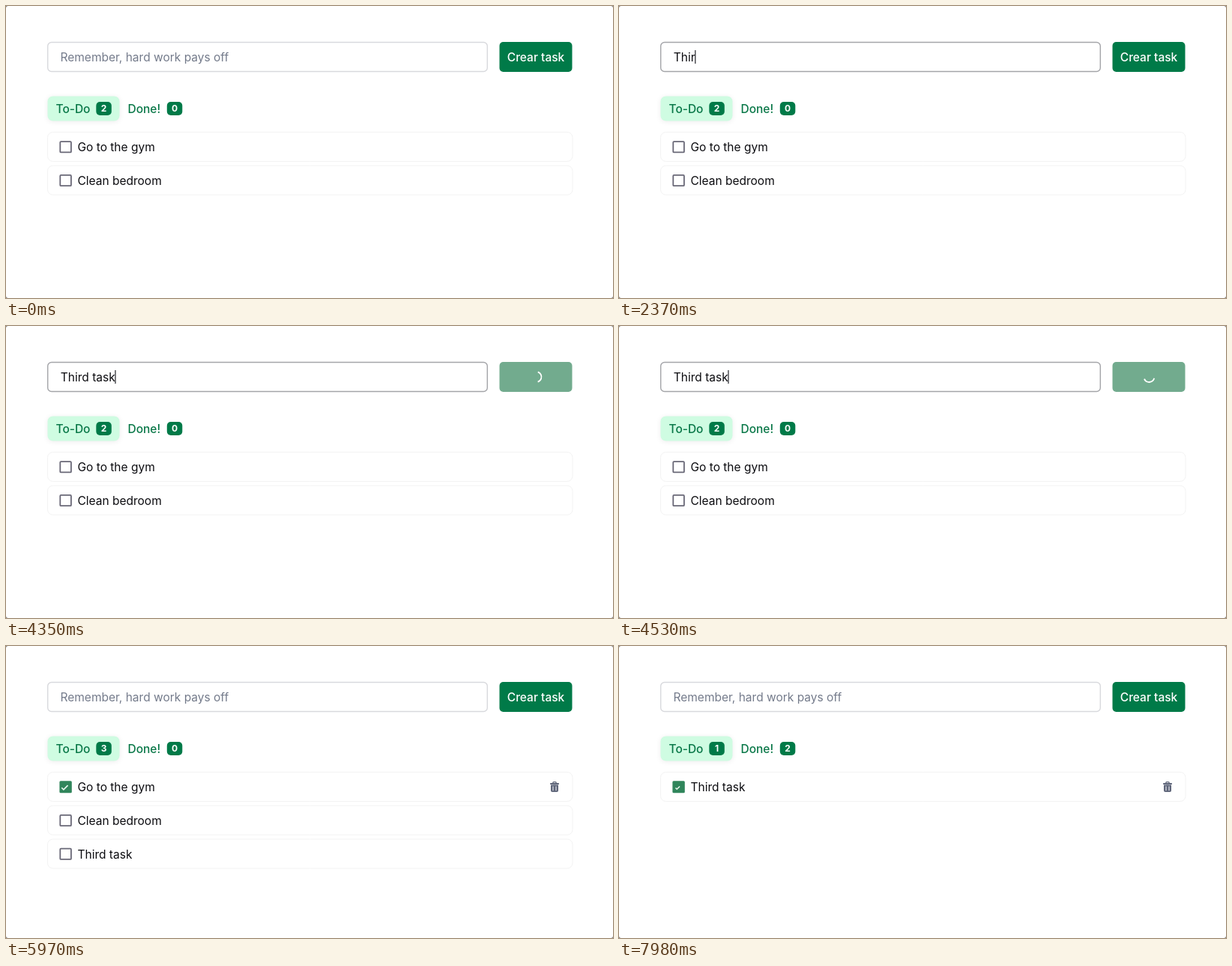
Animation of 810 by 390 pixels, one loop 8000 ms. Source, as an HTML page with a canvas:

```html
<!DOCTYPE html>
<html lang="en">
<head>
<meta charset="utf-8">
<title>Task list</title>
<style>
  html, body { margin: 0; width: 100%; height: 100%; overflow: hidden; background: #fff; }
  canvas { display: block; width: 810px; height: 390px; }
</style>
</head>
<body>
<canvas id="stage"></canvas>
<script>
const W = 810, H = 390, LOOP = 8000;
const canvas = document.getElementById('stage');
const ctx = canvas.getContext('2d');
const dpr = window.devicePixelRatio || 1;
canvas.width = W * dpr;
canvas.height = H * dpr;

const GREEN = '#007a48', INK = '#0c0c10', SLATE = '#5f667a';
const FONT = 'Inter, "Open Sans", sans-serif';
const FIRST_ROW = 168, ROW_STEP = 44.75, CHECK_TIME = 180;

const typed = 'Third task';
const keyTimes = [1980, 2130, 2250, 2370, 2490, 2640, 2880, 3000, 3150, 3390];
const caretSpans = [[1230, 1710], [1980, 3900], [4320, 4890], [5400, 5850]];
const tasks = [
  { name: 'Go to the gym', from: 0, checked: 5820, gone: 6150 },
  { name: 'Clean bedroom', from: 0, checked: 6750, gone: 7100 },
  { name: typed, from: 4590, checked: 7860, gone: Infinity }
];
const submit = 4320, added = 4590, trashShown = 5400;

const clamp = v => Math.max(0, Math.min(1, v));
const ramp = (t, a, b) => clamp((t - a) / (b - a));

function box(x, y, w, h, r, fill, stroke, line = 1) {
  ctx.beginPath();
  ctx.roundRect(x, y, w, h, r);
  if (fill) { ctx.fillStyle = fill; ctx.fill(); }
  if (stroke) { ctx.strokeStyle = stroke; ctx.lineWidth = line; ctx.stroke(); }
}

function text(str, x, y, color, weight = 400, size = 15.5, align = 'left') {
  ctx.font = `${weight} ${size}px ${FONT}`;
  ctx.textAlign = align;
  ctx.fillStyle = color;
  ctx.fillText(str, x, y);
}

function drawInput(t) {
  const hover = ramp(t, 585, 660) * (1 - ramp(t, 4875, 4950));
  const shade = [216, 217, 221].map(c => Math.round(c - 52 * hover));
  box(55.7, 48.5, 586.6, 39, 5, '#fff', `rgb(${shade})`, 1.4);

  const count = t < added ? keyTimes.filter(k => t >= k).length : 0;
  const value = typed.slice(0, count);
  if (count) text(value, 72.8, 74, INK);
  else text('Remember, hard work pays off', 72.5, 74, '#747b8b');

  if (caretSpans.some(([a, b]) => t >= a && t < b)) {
    ctx.font = `400 15.5px ${FONT}`;
    ctx.fillStyle = '#33343a';
    ctx.fillRect(72.4 + ctx.measureText(value).width, 59, 1.3, 18);
  }
}

function drawButton(t) {
  const busy = t >= submit && t < added;
  box(658.5, 48, 97, 40, 5, busy ? '#72ab8e' : GREEN);
  if (!busy) {
    text('Crear task', 707, 73.6, '#fff', 500, 15.5, 'center');
    return;
  }
  const turn = (t - 4350) / 750 * Math.PI * 2;
  ctx.beginPath();
  ctx.arc(707.5, 68, 7, turn - 1.25, turn + 1.25);
  ctx.strokeStyle = '#fff';
  ctx.lineWidth = 1.8;
  ctx.stroke();
}

function badge(x, n) {
  box(x, 128, 20.5, 18, 5, GREEN);
  text(n, x + 10.2, 141.3, '#fff', 700, 12, 'center');
}

function drawTabs(open, done) {
  ctx.save();
  ctx.shadowColor = 'rgba(0, 0, 0, .08)';
  ctx.shadowBlur = 7 * dpr;
  ctx.shadowOffsetY = dpr;
  box(55.5, 120.5, 96, 33, 7, '#cffce2');
  ctx.restore();
  text('To-Do', 66.5, 143, '#087747', 500);
  badge(120.3, open);
  text('Done!', 162.5, 143, '#087747', 500);
  badge(214.8, done);
}

function drawCheckbox(y, age) {
  if (age < 0) {
    box(72.3, y - 6.8, 14.6, 14.2, 1, '#fff', '#696877', 1.8);
    return;
  }
  box(71.4, y - 7.8, 16.4, 16, 1.5, '#30855b');
  const size = ramp(age, 60, CHECK_TIME);
  if (!size) return;
  ctx.beginPath();
  ctx.moveTo(78 - 5 * size, y + 2 - size);
  ctx.lineTo(78 - 1.5 * size, y + 2 + 2.5 * size);
  ctx.lineTo(78 + 6 * size, y + 2 - 5 * size);
  ctx.strokeStyle = '#e8f6ee';
  ctx.lineWidth = 1.3 + .5 * size;
  ctx.stroke();
}

function drawTrash(x, y) {
  box(x - 2.2, y - 6.3, 4.4, 3, 1, null, SLATE, 1.3);
  box(x - 6, y - 5, 12, 2, .8, SLATE);
  box(x - 5, y - 2.4, 10, 9.4, [0, 0, 2, 2], SLATE);
  for (const dx of [-2, 2]) box(x + dx - .6, y - .8, 1.2, 6, .5, '#dfe1e8');
}

function drawRows(t, open) {
  open.forEach((task, i) => {
    const top = FIRST_ROW + i * ROW_STEP, mid = top + 20;
    box(55.5, top + .5, 700.5, 39, 7, '#fff', '#f3f3f3');
    drawCheckbox(mid, t - task.checked);
    text(task.name, 95.5, mid + 6, INK);
    if (i === 0 && t >= trashShown) drawTrash(732, mid);
  });
}

function draw(t) {
  ctx.setTransform(dpr, 0, 0, dpr, 0, 0);
  ctx.fillStyle = '#777';
  ctx.fillRect(0, 0, W, H);
  box(0, 0, W, H, 3, '#fff');
  const open = tasks.filter(k => t >= k.from && t < k.gone);
  const done = tasks.filter(k => t >= k.gone).length;
  drawInput(t);
  drawButton(t);
  drawTabs(open.length, done);
  drawRows(t, open);
}

const start = performance.now();
function frame() {
  draw((performance.now() - start) % LOOP);
  requestAnimationFrame(frame);
}
frame();
</script>
</body>
</html>
```
